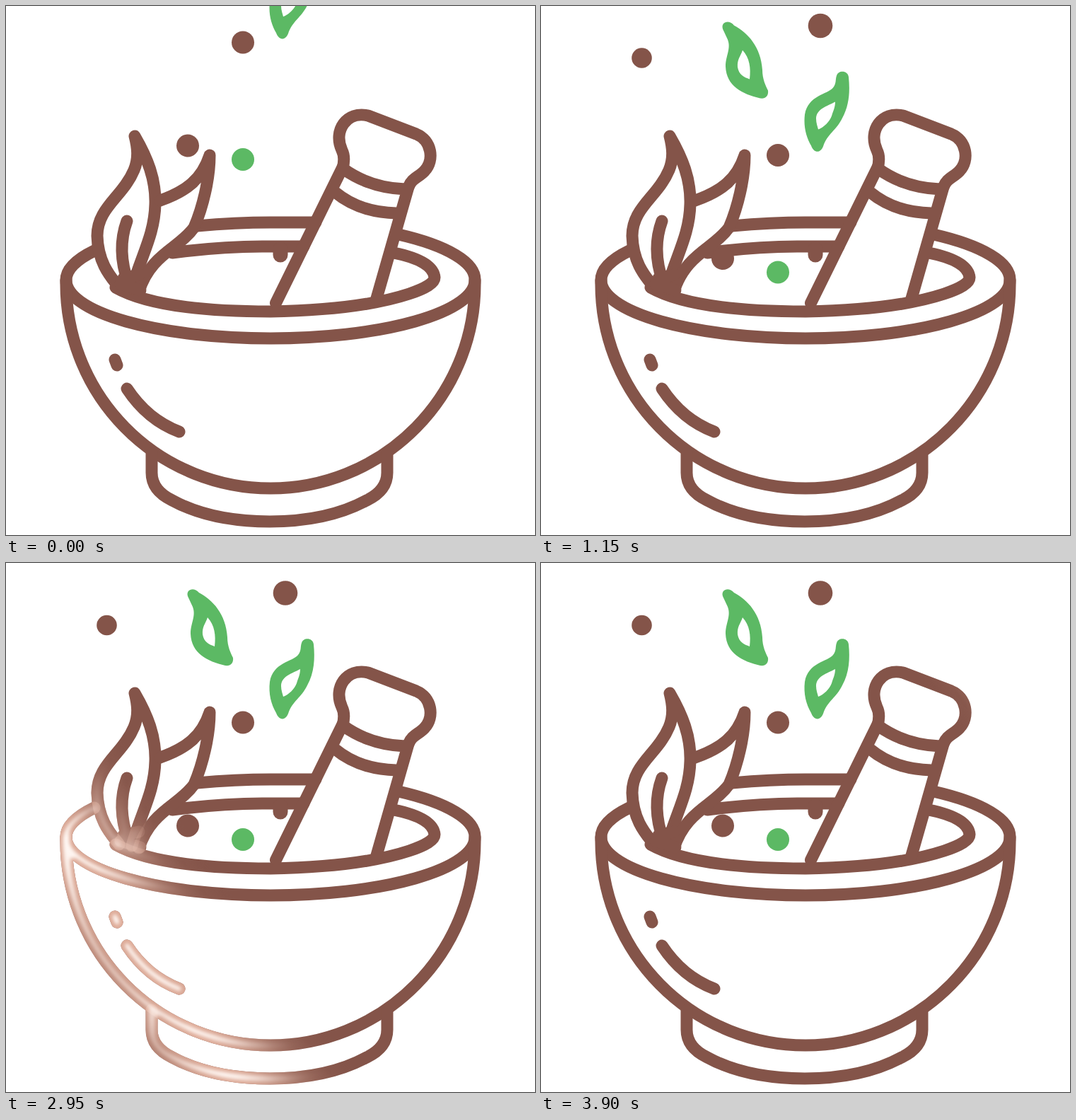
These frames come from a looping animation (748 px wide and 748 px high, 6500 ms). An HTML page:

```html
<!DOCTYPE html>
<html lang="en">
<head>
<meta charset="utf-8">
<title>Mortar and herbs</title>
<style>
  html, body { margin: 0; width: 100%; height: 100%; overflow: hidden; background: #fff; }
  svg { display: block; width: 100vw; height: 100vh; }
</style>
</head>
<body>
<svg viewBox="0 0 748 748">
  <defs id="defs">
    <filter id="bevel" filterUnits="userSpaceOnUse" x="0" y="0" width="748" height="748" color-interpolation-filters="sRGB">
      <feMorphology operator="erode" radius="4"/>
      <feGaussianBlur stdDeviation="2.4"/>
    </filter>

    <g id="mortar" fill="none" stroke-width="17" stroke-linecap="round" stroke-linejoin="round">
      <!-- rim, body and foot -->
      <path d="M125 346A289 82 0 0 0 85 388A289 82 0 0 0 663 388A289 82 0 0 0 555 323M270 311Q325 306 374 306H438"/>
      <path d="M155 398Q215 432 374 432Q500 430 570 407Q606 395 606 384Q604 360 548 349M235 349Q310 339 374 340H421"/>
      <path d="M85 388A289 289 0 0 0 374 682A289 289 0 0 0 663 388"/>
      <path d="M206 632V660Q206 685 235 699Q290 729 373 729Q455 729 510 699Q539 685 539 660V632"/>
      <path d="M154 500L157 508M171 541Q200 585 245 602"/>
      <path d="M388 344V352" stroke-width="21"/>
      <!-- pestle -->
      <path d="M476 229Q480 214 475 204C462 176 482 148 512 155L580 181C602 190 606 218 592 233C584 242 574 243 569 256"/>
      <path d="M478 231Q515 257 564 259M465 263Q500 292 552 293M476 228L381.500 420M569 256L523.500 415"/>
      <!-- herb leaves -->
      <path d="M160 398C150 385 130 365 129 325C129 285 165 270 181 232C188 215 186 200 182 184C200 215 212 245 211 280C210 325 190 355 178 400"/>
      <path d="M218 275C255 262 277 245 288 211C288 245 278 285 266 313C245 343 205 350 188 403"/>
      <path d="M171 304Q156 345 173 392M162 393L190 402M166 385L188 380"/>
    </g>

    <g id="seeds">
      <circle cx="142.500" cy="88" r="14.300"/>
      <circle cx="395" cy="42.500" r="17.300"/>
      <circle cx="335" cy="225.500" r="16"/>
      <circle cx="257" cy="371.500" r="16"/>
    </g>

    <g id="greens" fill-rule="evenodd">
      <circle cx="335" cy="391" r="16"/>
      <path d="M257 47C254 36 267 34 273 42C292 52 311 72 313 105C313 118 318 128 321 134C322 142 317 146 310 145C285 139 262 128 261 100C261 85 269 75 264 62Z
               M285 77C282 86 277 90 278 101C280 112 287 115 295 118C297 102 295 88 285 77Z"/>
      <path d="M418 113C420 105 434 105 435 115C437 135 436 155 426 173C418 190 405 195 399 213C395 223 386 223 382 212C375 200 371 185 373 168C378 140 405 140 413 130C418 124 416 118 418 113Z
               M416 150C405 156 389 160 389 174C389 180 391 185 392 189C400 186 408 178 411 170C413 163 416 158 416 150Z"/>
    </g>
  </defs>

  <use href="#mortar" stroke="#845449"/>
  <g id="falling">
    <use href="#seeds" fill="#845449"/>
    <use href="#greens" fill="#5cb964"/>
  </g>
  <g id="shine">
    <g>
      <use href="#mortar" stroke="url(#brownTint)"/>
      <use href="#seeds" fill="url(#brownTint)"/>
      <use href="#greens" fill="url(#greenTint)"/>
    </g>
    <g filter="url(#bevel)">
      <use href="#mortar" stroke="url(#brownGloss)"/>
      <use href="#greens" fill="url(#greenGloss)"/>
    </g>
  </g>
</svg>
<script>
const LOOP = 6500, STEP = 50;
const FALL = { end: 1650, from: -174 };
const SWEEP = { start: 2600, end: 3900, from: -400, to: 500, reach: 165, nx: 0.82, ny: -0.573 };

const byId = id => document.getElementById(id);
const svgNode = (name, attrs, parent) => {
  const node = document.createElementNS('http://www.w3.org/2000/svg', name);
  for (const key in attrs) node.setAttribute(key, attrs[key]);
  return parent.appendChild(node);
};

// A soft band of light; a higher power makes it narrower.
function makeBand(id, color, power) {
  const band = svgNode('linearGradient', { id, gradientUnits: 'userSpaceOnUse' }, byId('defs'));
  const stops = 16;
  for (let i = 0; i <= stops; i++) {
    const level = Math.sin(Math.PI * i / stops) ** power;
    svgNode('stop', { offset: i / stops, 'stop-color': color, 'stop-opacity': level }, band);
  }
  return band;
}

const bands = [
  makeBand('brownTint', '#e0ae9b', 3.2),
  makeBand('greenTint', '#92f29d', 2.6),
  makeBand('brownGloss', '#fff8f4', 6),
  makeBand('greenGloss', '#f6fff6', 5)
];

const clamp = v => Math.min(1, Math.max(0, v));

function bezierEase(x1, y1, x2, y2) {
  const curve = (a, b, t) => 3 * t * (1 - t) ** 2 * a + 3 * t * t * (1 - t) * b + t ** 3;
  return x => {
    if (x <= 0 || x >= 1) return clamp(x);
    let low = 0, high = 1;
    for (let i = 0; i < 30; i++) {
      const mid = (low + high) / 2;
      if (curve(x1, x2, mid) < x) low = mid; else high = mid;
    }
    return curve(y1, y2, low);
  };
}

const fallEase = bezierEase(0.65, 0, 0.25, 1);
const sweepEase = bezierEase(0.33, 0.2, 0.67, 1);

function render(time) {
  const t = Math.floor((time % LOOP) / STEP) * STEP;

  const drop = FALL.from * (1 - fallEase(t / FALL.end));
  byId('falling').setAttribute('transform', `translate(0 ${drop.toFixed(2)})`);

  const lit = t > SWEEP.start;
  byId('shine').setAttribute('display', lit ? 'inline' : 'none');
  if (!lit) return;

  const progress = sweepEase((t - SWEEP.start) / (SWEEP.end - SWEEP.start));
  const center = SWEEP.from + (SWEEP.to - SWEEP.from) * progress;
  const near = center - SWEEP.reach, far = center + SWEEP.reach;
  for (const band of bands) {
    band.setAttribute('x1', near * SWEEP.nx);
    band.setAttribute('y1', near * SWEEP.ny);
    band.setAttribute('x2', far * SWEEP.nx);
    band.setAttribute('y2', far * SWEEP.ny);
  }
}

let origin = null, shown = -1;
function tick(now) {
  if (origin === null) origin = now;
  const index = Math.floor((now - origin) / STEP);
  if (index !== shown) {
    shown = index;
    render(now - origin);
  }
  requestAnimationFrame(tick);
}
render(0);
requestAnimationFrame(tick);
</script>
</body>
</html>
```
